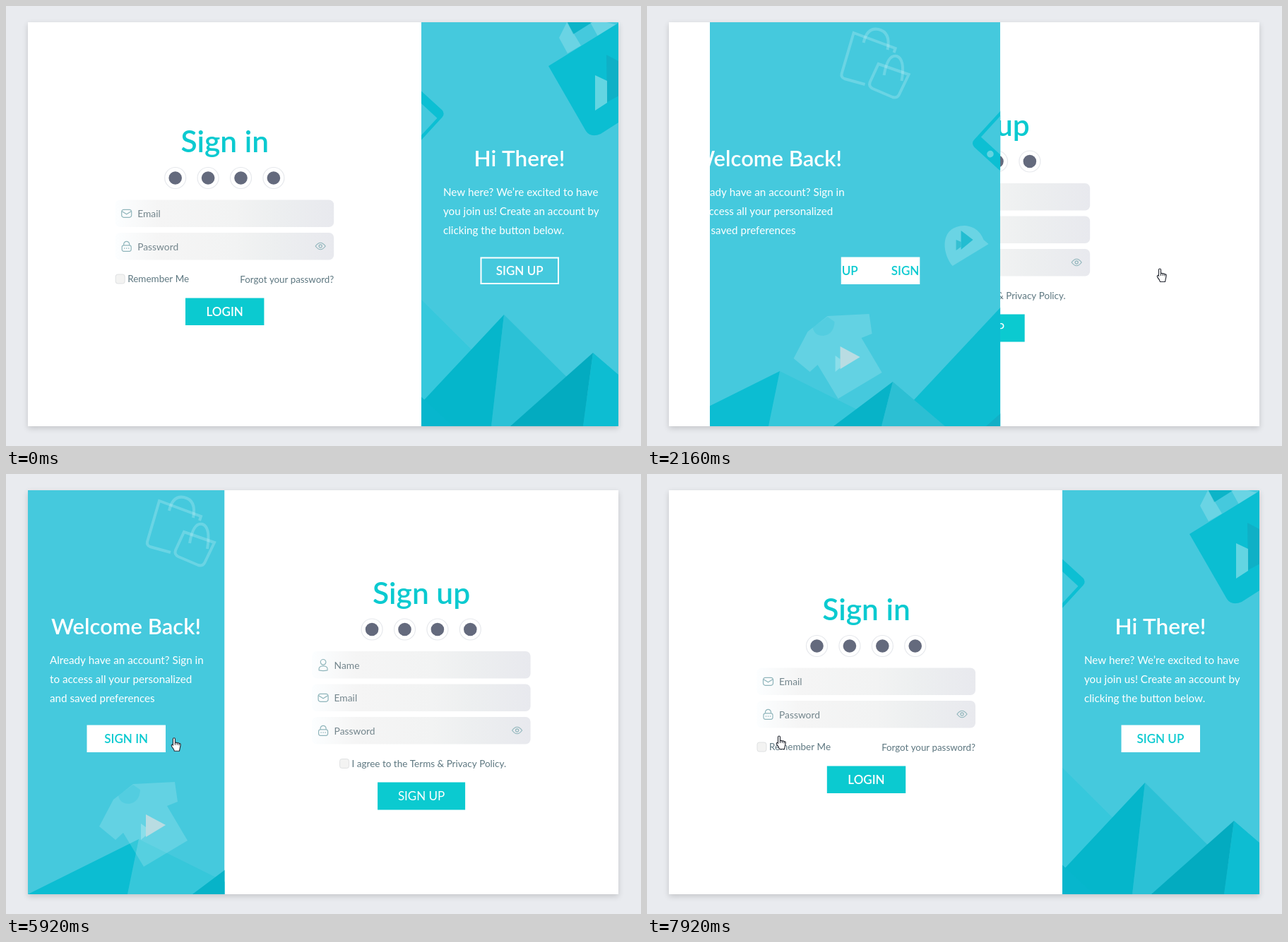
Write an HTML page with a canvas that moves like this. It is 899 px wide and 623 px high and loops after 8000 ms.

```html
<!DOCTYPE html>
<html lang="en">
<head>
<meta charset="utf-8">
<title>Sliding sign in form</title>
<style>
html, body { margin: 0; width: 100%; height: 100%; overflow: hidden; background: #e9ebef; }
canvas { display: block; width: 899px; height: 623px; }
</style>
</head>
<body>
<canvas id="stage" width="899" height="623"></canvas>
<script>
const ctx = document.getElementById('stage').getContext('2d');
const LOOP = 8000;
const TEAL = '#0bcad0', PANEL = '#45c9dd', INK = '#5d7780', ICON = '#8fb5bb';
const TOP = 23, BOTTOM = 595;

// Smooth monotone curve through [time, value] points.
function track(t, pts) {
  const n = pts.length - 1;
  if (t <= pts[0][0]) return pts[0][1];
  if (t >= pts[n][0]) return pts[n][1];
  let i = 0;
  while (t > pts[i + 1][0]) i++;
  const rate = j => (pts[j + 1][1] - pts[j][1]) / (pts[j + 1][0] - pts[j][0]);
  const slope = j => {
    if (j === 0 || j === n) return 0;
    const a = rate(j - 1), b = rate(j);
    return a * b <= 0 ? 0 : 2 * a * b / (a + b);
  };
  const [t0, v0] = pts[i], [t1, v1] = pts[i + 1];
  const h = t1 - t0, u = (t - t0) / h, w = 1 - u;
  return v0 * (1 + 2 * u) * w * w + slope(i) * h * u * w * w
    + v1 * u * u * (3 - 2 * u) - slope(i + 1) * h * u * u * w;
}

// Slide progress by time since the click.
const SLIDE = {
  lead: [[0, 0], [250, .197], [370, .521], [650, .923], [900, 1]],
  trail: [[240, 0], [370, .297], [650, .7], [1010, .977], [1290, 1]],
  form: [[0, 0], [250, .17], [370, .405], [650, .615], [1010, .935], [1290, .997], [1340, 1]],
  button: [[0, 0], [250, .1], [370, .401], [650, .748], [1010, .99], [1250, 1]],
  layer: [[150, 0], [250, .025], [370, .15], [650, .4], [1010, .915], [1290, 1]]
};
const CURSOR_X = [[440, 880], [480, 866], [1040, 729], [4490, 729], [4560, 716], [4960, 558], [5400, 558], [6080, 190]];
const CURSOR_Y = [[440, 434], [1040, 381], [4560, 381], [4960, 400], [5400, 400], [6080, 380]];

function poly(fill, ...xy) {
  ctx.beginPath();
  for (let i = 0; i < xy.length; i += 2) ctx.lineTo(xy[i], xy[i + 1]);
  ctx.closePath();
  ctx.fillStyle = fill;
  ctx.fill();
}

function shape(d, fill, stroke, width = 1) {
  const path = new Path2D(d);
  if (fill) { ctx.fillStyle = fill; ctx.fill(path); }
  if (stroke) { ctx.strokeStyle = stroke; ctx.lineWidth = width; ctx.stroke(path); }
}

function box(x, y, w, h, r, fill, stroke, width = 1) {
  ctx.beginPath();
  ctx.roundRect(x, y, w, h, r);
  if (fill) { ctx.fillStyle = fill; ctx.fill(); }
  if (stroke) { ctx.strokeStyle = stroke; ctx.lineWidth = width; ctx.stroke(); }
}

function disc(x, y, r, fill, stroke) {
  ctx.beginPath();
  ctx.arc(x, y, r, 0, Math.PI * 2);
  if (fill) { ctx.fillStyle = fill; ctx.fill(); }
  if (stroke) { ctx.strokeStyle = stroke; ctx.lineWidth = 1.2; ctx.stroke(); }
}

function text(s, x, y, size, fill, weight = 400, align = 'left') {
  ctx.font = `${weight} ${size}px Lato, "Open Sans", sans-serif`;
  ctx.textAlign = align;
  ctx.fillStyle = fill;
  ctx.fillText(s, x, y);
}

function at(x, y, draw) {
  ctx.save();
  ctx.translate(x, y);
  draw();
  ctx.restore();
}

function clipped(x, y, w, h, draw) {
  ctx.save();
  ctx.beginPath();
  ctx.rect(x, y, w, h);
  ctx.clip();
  draw();
  ctx.restore();
}

const icons = {
  Email() {
    box(-7, -5.5, 14, 11, 3, null, ICON, 1.2);
    shape('M-6.5 -3 L0 1 L6.5 -3', null, ICON, 1.2);
  },
  Password() {
    box(-6.5, -1.5, 13, 8.5, 2.5, null, ICON, 1.2);
    shape('M-4 -1.5 V-3 A4 4 0 0 1 4 -3 V-1.5', null, ICON, 1.2);
    for (const x of [-3, 0, 3]) disc(x, 2.8, .8, ICON);
  },
  Name() {
    disc(0, -4, 3.8, null, ICON);
    shape('M-6 7.5 Q-7 1.5 0 1.5 Q7 1.5 6 7.5 Q0 9 -6 7.5Z', null, ICON, 1.2);
  }
};

// Form parts are placed around the form's centre line x = 0.
function field(label, y) {
  const g = ctx.createLinearGradient(-155, 0, 155, 0);
  g.addColorStop(0, '#fcfeff');
  g.addColorStop(.2, '#f5f5f5');
  g.addColorStop(.55, '#f2f3f3');
  g.addColorStop(.72, '#edeff0');
  g.addColorStop(1, '#e8e9ee');
  box(-155, y, 309.5, 38.5, 7, g);
  at(-139, y + 19.3, icons[label]);
  text(label, -123.5, y + 24.5, 13.8, '#73858c');
  if (label === 'Password') at(135.5, y + 19, () => {
    shape('M-7 0 Q0 -9.5 7 0 Q0 9.5 -7 0Z', null, ICON, 1.2);
    disc(0, 0, 2.1, null, ICON);
  });
}

function socials(y) {
  for (let i = 0; i < 4; i++) {
    const x = -70 + 46.4 * i;
    disc(x, y, 15, '#fff', '#e6e8ec');
    disc(x, y, 9.3, '#646a7d');
  }
}

function checkbox(x, y, label) {
  box(x + .5, y + .5, 13, 13, 3, '#f3f3f2', '#dfe1e2');
  text(label, x + 17.5, y + 11.8, 13.5, INK);
}

function signIn() {
  text('Sign in', 0, 207, 42.5, TEAL, 600, 'center');
  socials(243.5);
  field('Email', 274.5);
  field('Password', 321);
  checkbox(-155, 379.5, 'Remember Me');
  text('Forgot your password?', 154.5, 391.8, 13.3, INK, 400, 'right');
  box(-55.7, 413.5, 111.4, 38.5, 0, TEAL);
  text('LOGIN', 0, 439, 17, '#fff', 600, 'center');
}

function signUp() {
  text('Sign up', 0, 184, 42.5, TEAL, 600, 'center');
  socials(220);
  field('Name', 251);
  field('Email', 297.5);
  field('Password', 344);
  checkbox(-116, 403, 'I agree to the Terms & Privacy Policy.');
  box(-62, 436.5, 124, 39, 0, TEAL);
  text('SIGN UP', 0, 462, 17, '#fff', 400, 'center');
}

// Left base, peak, foot of the ridge, right base, dark side, light side.
function mountain(l, x, y, foot, r, dark, light) {
  poly(light, x, y, foot, BOTTOM, r, BOTTOM);
  poly(dark, l, BOTTOM, x, y, foot, BOTTOM);
}

function mountains() {
  mountain(31, 188, 517, 172, 345, '#0cbdd2', '#36c7da');
  mountain(343, 548, 376, 508, 768, '#0dbdd1', '#36c8dc');
  mountain(264, 348, 532, 332, 422, '#07b3c8', '#2cbfd3');
  mountain(557, 705, 437, 687, 864, '#05b6cb', '#2bc1d6');
  mountain(480, 558, 526, 549, 633, '#12afc6', '#07b6cd');
  mountain(714, 831, 491, 817, 952, '#03abc0', '#0dbdd2');
}

function shoppingBags() {
  const line = 'rgba(255,255,255,.2)';
  shape('M233 111 L204 103 Q199 101 200 96 L217 38 L276 60 L274 66', null, line, 4);
  shape('M231 52 Q236 30 252 33 Q270 37 265 62', null, line, 4);
  shape('M252 82 L295 97 L281 126 Q278 131 272 129 L244 117 Q238 114 240 108Z', null, line, 4);
  shape('M260 98 Q265 68 278 71 Q290 75 285 106', null, line, 4);
}

function shirt() {
  poly('rgba(255,255,255,.16)', 152, 461, 180, 439, 239, 436, 243, 464, 228, 470,
    257, 519, 195, 556, 166, 508, 155, 518, 132, 499);
  shape('M159 455 Q161 467 174 467 Q189 465 190 447 L180 440Z', 'rgba(69,201,221,.5)');
  poly('rgba(255,255,255,.25)', 191, 495, 198, 500, 198, 512, 191, 518);
  poly('#b9dce2', 198, 482, 226, 497, 198, 514);
}

function phone() {
  ctx.rotate(-47.5 * Math.PI / 180);
  box(-57, -30.5, 114, 61, 7, '#0cbfd3');
  box(-40, -26, 84, 52, 0, PANEL);
  disc(-49, 0, 4.8, '#62d3e1');
}

function cap() {
  shape('M360 368 C345 350 341 312 377 311 C395 312 402 325 404 331 L411 337Z', 'rgba(255,255,255,.2)');
  poly('#35c0d2', 365, 331, 372, 334, 372, 341, 365, 346);
  poly('#22bdd1', 372, 318, 389, 331, 372, 345);
}

function playBag() {
  const glow = 'rgba(255,255,255,.2)';
  poly('#0cb4c8', 795, 23, 830, 23, 803, 40);
  poly(glow, 783, 45, 794, 23, 814, 56, 795, 67);
  poly(glow, 827, 23, 850, 23, 866, 27, 838, 43);
  shape('M768 85 L885 13 L945 115 L842 181 Q828 187 821 177Z', '#0bbed2');
  poly('#0fb0c6', 850, 69, 914, 103, 851, 136);
  poly('rgba(255,255,255,.36)', 834, 98, 851, 106, 851, 137, 834, 148);
}

function messages() {
  const lines = (x, ...rows) => rows.forEach((s, i) => text(s, x, 269 + 27.2 * i, 15.2, '#fff'));
  text('Hi There!', 727, 227, 31.5, '#fff', 600, 'center');
  lines(619, 'New here? We’re excited to have', 'you join us! Create an account by', 'clicking the button below.');
  text('Welcome Back!', 170, 227, 31, '#fff', 600, 'center');
  lines(62, 'Already have an account? Sign in', 'to access all your personalized', 'and saved preferences');
}

function switchButton(x, shift, active) {
  if (active) box(x, 355.5, 111.5, 38.5, 0, '#fff');
  else box(x + 1, 356.5, 109.5, 36.5, 0, null, '#fff', 2);
  clipped(x, 355, 111.5, 40, () => {
    const ink = active ? TEAL : '#fff', mid = x + 55.7 - 111.5 * shift;
    text('SIGN UP', mid, 381, 17, ink, 600, 'center');
    text('SIGN IN', mid + 111.5, 381, 17, ink, 600, 'center');
  });
}

function hand() {
  shape('M-4.5 1 V-7.5 Q-4.5 -9 -3 -9 Q-1.5 -9 -1.5 -7.5 V-2 Q0 -3.5 1.3 -1.8 Q3 -3 4 -1 Q6.2 -1.8 6.2 .8' +
    ' L5.4 5 Q5 7 4.4 9.5 H-2.5 Q-3 7 -6 3.5 Q-7.4 1.2 -6 .4 Q-5.2 .2 -4.5 1Z', '#fff', '#2b2f38', 1.2);
  shape('M-1.5 -2 V1 M1.3 -1.8 V1 M4 -1 V1.5', null, '#2b2f38', 1);
}

function render(t) {
  const toLeft = t < 4000;
  const since = t - (toLeft ? 1550 : 6630);
  const step = name => track(since, SLIDE[name]);
  const state = name => toLeft ? step(name) : 1 - step(name);
  const left = toLeft ? 588 - 557 * step('lead') : 31 + 557 * step('trail');
  const right = toLeft ? 867 - 557.5 * step('trail') : 309.5 + 557.5 * step('lead');
  const formPos = state('form');

  ctx.fillStyle = '#e9ebef';
  ctx.fillRect(0, 0, 899, 623);
  ctx.save();
  ctx.shadowColor = 'rgba(0,0,0,.16)';
  ctx.shadowBlur = 8;
  ctx.shadowOffsetY = 3;
  box(31, TOP, 836, BOTTOM - TOP, 0, '#fff');
  ctx.restore();

  at(309.7 + 278.4 * formPos, 0, formPos < .5 ? signIn : signUp);

  clipped(left, TOP, right - left, BOTTOM - TOP, () => {
    ctx.fillStyle = PANEL;
    ctx.fillRect(left, TOP, right - left, BOTTOM - TOP);
    mountains();
    const drift = -118 * state('layer');
    at(118 + drift, 0, shoppingBags);
    at(118 + drift, 0, shirt);
    at(561.5 + drift, 173.5, phone);
    at(115 + drift, 0, cap);
    at(drift, 0, playBag);
    messages();
    const active = (t >= 860 && t < 3680) || t >= 5920;
    switchButton(671.5 - 557 * state('button'), formPos, active);
  });

  if (t >= 480) at(track(t, CURSOR_X), track(t, CURSOR_Y), hand);
}

function frame() {
  render(performance.now() % LOOP);
  requestAnimationFrame(frame);
}
frame();
</script>
</body>
</html>
```
